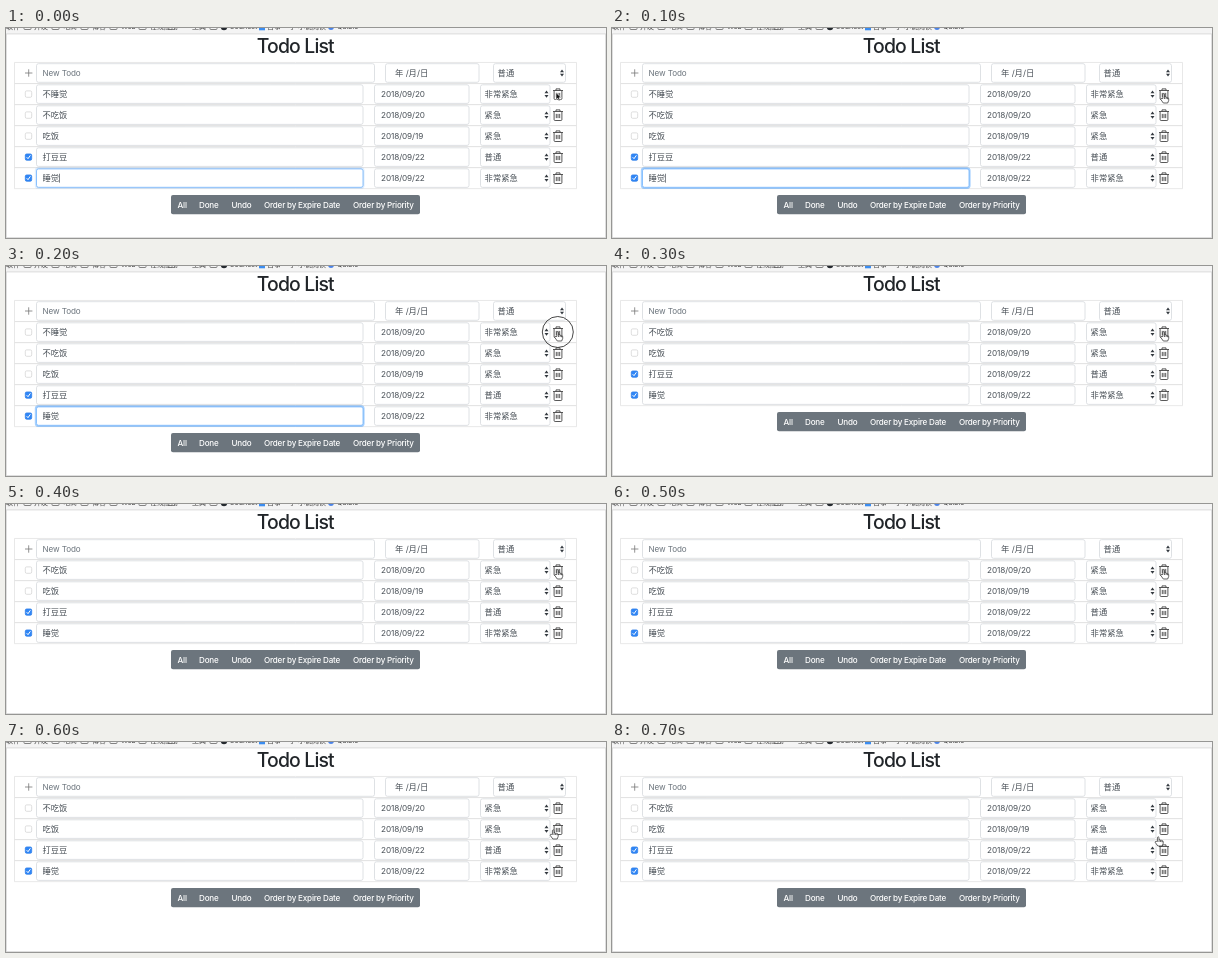
An HTML page with a canvas for the animation above (800 ms loop, 600 px wide and 210 px high).

```html
<!DOCTYPE html>
<html lang="zh">
<head>
<meta charset="utf-8">
<title>Todo List</title>
<style>
html, body { margin: 0; width: 100%; height: 100%; overflow: hidden; background: #fff; }
canvas { display: block; width: 600px; height: 210px; }
</style>
</head>
<body>
<canvas id="stage"></canvas>
<script>
const W = 600, H = 210, LOOP = 800, STEP = 100, PITCH = 21.1;
const FONT = 'Inter, "Noto Sans CJK SC", "Noto Sans CJK", sans-serif';
const canvas = document.getElementById('stage');
const ctx = canvas.getContext('2d');
const ratio = Math.max(1, window.devicePixelRatio || 1);
canvas.width = W * ratio;
canvas.height = H * ratio;

const todos = [
  { name: '不睡觉', date: '2018/09/20', level: '非常紧急' },
  { name: '不吃饭', date: '2018/09/20', level: '紧急' },
  { name: '吃饭', date: '2018/09/19', level: '紧急' },
  { name: '打豆豆', date: '2018/09/22', level: '普通', done: true },
  { name: '睡觉', date: '2018/09/22', level: '非常紧急', done: true }
];
const buttons = [['All', 171.5], ['Done', 193], ['Undo', 225.5],
  ['Order by Expire Date', 258], ['Order by Priority', 347]];
const bookmarks = [['软件', 0], ['开发', 28], ['电商', 57], ['博客', 86], ['Web', 115],
  ['在线应用', 144], ['工具', 186]];

function text(s, x, y, size = 8.3, color = '#495057', weight = 400, spacing = 0) {
  ctx.font = `${weight} ${size}px ${FONT}`;
  ctx.letterSpacing = spacing + 'px';
  ctx.fillStyle = color;
  ctx.fillText(s, x, y);
}

function box(x, y, w, h, r, fill, stroke, line = 1) {
  ctx.beginPath();
  ctx.roundRect(x, y, w, h, r);
  if (fill) { ctx.fillStyle = fill; ctx.fill(); }
  if (stroke) { ctx.strokeStyle = stroke; ctx.lineWidth = line; ctx.stroke(); }
}

function path(d, color, line = 0.8, fill) {
  const p = new Path2D(d);
  if (fill) { ctx.fillStyle = fill; ctx.fill(p); }
  ctx.strokeStyle = color;
  ctx.lineWidth = line;
  ctx.stroke(p);
}

function at(x, y, draw) {
  ctx.save();
  ctx.translate(x, y);
  draw();
  ctx.restore();
}

function field(x, y, w) {
  box(x + 0.5, y - 9.3, w - 1, 18.6, 2, '#fff', '#d6dade', 0.8);
}

function select(x, y, w, label) {
  field(x, y, w);
  text(label, x + 4.6, y + 3.1);
  at(x + w - 4, y, () => {
    ctx.fillStyle = '#343a40';
    ctx.fill(new Path2D('M-2-.8L0-3.6 2-.8zM-2 .8L0 3.6 2 .8z'));
  });
}

function checkbox(y, done) {
  box(19.3, y - 3.2, 6.4, 6.4, 1.4, done ? '#2f86f6' : '#fff', done ? '#2f7fe8' : '#d0d0d0', 0.7);
  if (done) at(22.5, y, () => path('M-1.8.1L-.5 1.6 1.9-1.8', '#fff', 1));
}

function trash(y) {
  at(552, y, () => path('M-5-3.6H5M-2-3.8V-5.2H2V-3.8M-3.9-3.4V4.4Q-3.9 5.4-2.9 5.4H2.9Q3.9 5.4 3.9 4.4V-3.4M-1.7-1.2V3M0-1.2V3M1.7-1.2V3', '#3a3a3a', 0.85));
}

function frame(y) {
  box(8.5, y - PITCH / 2, 562, PITCH, 0, null, '#e2e2e2', 0.8);
}

function browser() {
  ctx.fillStyle = '#f4f4f4';
  ctx.fillRect(0, 0, W, 5.5);
  ctx.fillStyle = '#d2d2d2';
  ctx.fillRect(0, 5.5, W, 0.8);
  for (const [label, x] of bookmarks) {
    text(label, x, 1.4, 7, '#444');
    box(x + 18, -4, 7, 5.5, 0.8, null, '#666', 0.8);
  }
  ctx.fillStyle = '#24292e';
  ctx.beginPath();
  ctx.arc(218, -1, 3.3, 0, 7);
  ctx.fill();
  text('Codnest', 223.5, 1.4, 7, '#444');
  ctx.fillStyle = '#3b8df0';
  ctx.fillRect(253, -4, 6, 6.3);
  text('百事', 261, 1.4, 7, '#444');
  text('了', 283, 1.4, 7, '#444');
  text('小说阅读', 292, 1.4, 7, '#444');
  ctx.fillStyle = '#4b83e8';
  ctx.beginPath();
  ctx.arc(325, -1, 3, 0, 7);
  ctx.fill();
  text('Quiblo', 331, 1.4, 7, '#444');
}

function header() {
  text('Todo List', 250.8, 25, 19.4, '#212529', 500, -0.85);
  frame(45);
  at(22.7, 45, () => path('M-3.7 0H3.7M0-3.7V3.7', '#777', 0.8));
  field(30, 45, 339);
  text('New Todo', 36.5, 48, 8.1, '#6c757d', 400, -0.1);
  field(379, 45, 94.5);
  text('年 /月/日', 389, 48);
  select(487, 45, 73, '普通');
}

function row(todo, y, focus, caret) {
  frame(y);
  checkbox(y, todo.done);
  field(30, y, 327.5);
  if (focus) {
    box(29.7, y - 10, 328, 20, 2.5, null, `rgba(0,123,255,${focus})`, 1.8);
    box(30.5, y - 9.2, 326.5, 18.4, 2, '#fff', '#80bdff', 0.9);
  }
  text(todo.name, 36.5, y + 3.1);
  if (caret) {
    ctx.fillStyle = '#495057';
    ctx.fillRect(53.3, y - 4.4, 0.7, 9);
  }
  field(368, y, 95.5);
  text(todo.date, 375, y + 3, 8.2, '#495057', 400, -0.1);
  select(474, y, 70.5, todo.level);
  trash(y);
}

function toolbar(y) {
  box(165, y, 249, 19.2, 2, '#6c757d');
  for (const [label, x] of buttons) text(label, x, y + 12.7, 8.1, '#fff', 500, -0.2);
}

function arrow(x, y) {
  at(x, y, () => path('M0 0V7.2L1.7 5.7 2.9 8.4 4.2 7.8 3 5.2H5.2Z', '#fff', 0.6, '#111'));
}

function hand(x, y) {
  at(x, y, () => path('M-1.6 .5V-3.6Q-.8-4.8 0-3.6V-1Q1-1.6 1.6-.7 2.6-1.2 3-.2 4.2-.4 4.2 .8V2.4L3.2 5H-1.2L-3.8 1.3Q-3.6 0-2.6.4Z M0-.8V1M1.6-.6V1M3-.1V1.2', '#222', 0.7, '#fff'));
}

function pointer(step) {
  if (step === 0) arrow(550, 64.5);
  else if (step < 6) hand(552.5, 70);
  else if (step === 6) hand(548, 92);
  else hand(547, 99);
  if (step === 2) {
    ctx.beginPath();
    ctx.arc(551.8, 66, 15.5, 0, 7);
    ctx.strokeStyle = '#333';
    ctx.lineWidth = 0.9;
    ctx.stroke();
  }
}

function render(now) {
  const step = Math.floor((now % LOOP) / STEP);
  const removed = step >= 3;
  const list = removed ? todos.slice(1) : todos;
  ctx.setTransform(ratio, 0, 0, ratio, 0, 0);
  ctx.fillStyle = '#fff';
  ctx.fillRect(0, 0, W, H);
  browser();
  header();
  list.forEach((todo, i) => {
    const active = !removed && i === list.length - 1;
    row(todo, 66.1 + i * 21, active && (step ? 0.35 : 0.12), active && step < 2);
  });
  toolbar(removed ? 146 : 167);
  ctx.fillStyle = '#d8d8d8';
  ctx.fillRect(0, 6, 0.8, H);
  ctx.fillRect(W - 0.8, 6, 0.8, H);
  ctx.fillRect(0, H - 0.8, W, 0.8);
  pointer(step);
}

function tick() {
  render(performance.now());
  requestAnimationFrame(tick);
}
tick();
</script>
</body>
</html>
```
